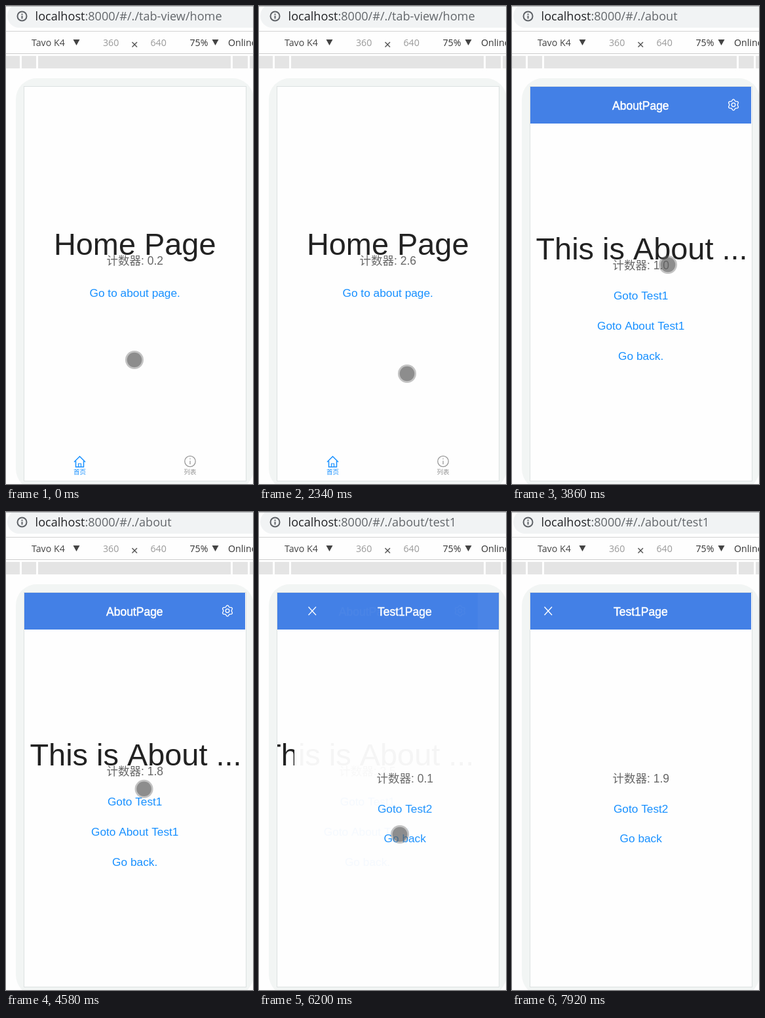
An HTML page with a canvas for the animation above (8 s loop, 377 by 728 pixels).

```html
<!DOCTYPE html>
<html lang="zh">
<head>
<meta charset="utf-8">
<title>Tab view</title>
<style>
html, body { margin: 0; width: 100%; height: 100%; overflow: hidden; background: #fff; }
canvas { display: block; width: 377px; height: 728px; }
</style>
</head>
<body>
<canvas id="stage" width="377" height="728"></canvas>
<script>
const W = 377, H = 728, LOOP = 8000, STEP = 90, RESYNC = 2960;
const SCREEN = { x: 28, y: 123, w: 338, h: 600 };
const MID = 196.7;
const BIG = 46.9, BODY = 17.3;
const SANS = '"Liberation Sans", "Noto Sans CJK SC", "Noto Sans CJK", sans-serif';
const UI = '"Open Sans", "Noto Sans", sans-serif';
const BLUE = '#1890ff', BAR = '#4380e6', WHITE = '#fefefe';
const SLIDE = 178, TICK = 95.5;

const stage = document.getElementById('stage').getContext('2d');
const layer = Object.assign(document.createElement('canvas'), { width: W, height: H });
const layerCtx = layer.getContext('2d');

// Each page: when it enters, when its counter starts, its address and painter
const pages = [
  { enter: -1000, zero: -232, url: 'tab-view/home', paint: paintHome },
  { enter: 2856, zero: 2856, url: 'about', paint: paintAbout },
  { enter: 6082, zero: 6075, url: 'about/test1', paint: paintTest }
];

// Pointer path: time, x, y
const path = [
  [0, 196, 539], [630, 198, 553], [800, 198, 553], [1530, 205, 594],
  [1620, 216, 623], [1800, 230, 655], [1980, 233, 659], [2340, 226, 560],
  [2610, 220, 444], [3420, 220, 444], [3680, 243, 412], [3860, 238, 394],
  [4220, 159, 391], [4400, 175, 395], [4850, 264, 462], [5030, 254, 478],
  [5300, 224, 485], [5660, 215, 491], [6780, 215, 491], [7480, 264, 275]
];
const POINTER_END = 7550;

function ease(p) {
  if (p <= 0) return 0;
  if (p >= 1) return 1;
  const bez = (a, b, u) => 3 * a * u * (1 - u) ** 2 + 3 * b * u * u * (1 - u) + u ** 3;
  let lo = 0, hi = 1;
  for (let i = 0; i < 24; i++) {
    const m = (lo + hi) / 2;
    if (bez(0.25, 0.25, m) < p) lo = m; else hi = m;
  }
  return bez(0.1, 1, lo);
}

function text(c, str, x, y, size, color, align = 'center', family = SANS) {
  c.font = `${size}px ${family}`;
  c.textAlign = align;
  c.fillStyle = color;
  c.fillText(str, x, y);
}

function rect(c, x, y, w, h, color) {
  c.fillStyle = color;
  c.fillRect(x, y, w, h);
}

function line(c, points, color, width, close) {
  c.beginPath();
  points.forEach(([x, y]) => c.lineTo(x, y));
  if (close) c.closePath();
  c.strokeStyle = color;
  c.lineWidth = width;
  c.stroke();
}

function ring(c, x, y, r, color, width) {
  c.beginPath();
  c.arc(x, y, r, 0, 7);
  c.strokeStyle = color;
  c.lineWidth = width;
  c.stroke();
}

function disc(c, x, y, r, color) {
  c.beginPath();
  c.arc(x, y, r, 0, 7);
  c.fillStyle = color;
  c.fill();
}

function infoIcon(c, x, y, r, color, width) {
  ring(c, x, y, r, color, width);
  rect(c, x - width / 2, y - r * 0.55, width, width, color);
  rect(c, x - width / 2, y - r * 0.1, width, r * 0.65, color);
}

function gear(c, x, y) {
  const pts = [];
  for (let i = 0; i < 48; i++) {
    const a = i * Math.PI / 24;
    const r = 7.2 + 1.1 * Math.cos(6 * a);
    pts.push([x + r * Math.sin(a), y - r * Math.cos(a)]);
  }
  line(c, pts, '#fff', 1.3, true);
  ring(c, x, y, 2.8, '#fff', 1.3);
}

function counter(c, value, y) {
  text(c, '计数器: ' + value, MID, y, 17.5, '#666');
}

function link(c, label, y) {
  text(c, label, MID, y, BODY, BLUE);
}

// Title is set a little heavier than regular
function header(c, title) {
  rect(c, 28, 123, 337, 56, BAR);
  text(c, title, 196.3, 158, 17.5, '#fff');
  c.strokeStyle = '#fff';
  c.lineWidth = 0.5;
  c.strokeText(title, 196.3, 158);
}

function paintHome(c, value) {
  text(c, 'Home Page', MID, 379, BIG, '#222');
  counter(c, value, 394);
  link(c, 'Go to about page.', 443);
  line(c, [[104, 694.5], [112.5, 686], [121, 694.5]], BLUE, 1.5);
  line(c, [[106.5, 693], [106.5, 702], [118.5, 702], [118.5, 693]], BLUE, 1.5);
  line(c, [[110.5, 702], [110.5, 697], [114.5, 697], [114.5, 702]], BLUE, 1.2);
  text(c, '首页', 112.5, 713, 9.5, BLUE);
  infoIcon(c, 281, 693.5, 8.2, '#999', 1.3);
  text(c, '列表', 281, 713, 9.5, '#949494');
}

function paintAbout(c, value) {
  header(c, 'AboutPage');
  gear(c, 338, 150.5);
  text(c, 'This is About ...', 198, 386, BIG, '#222');
  counter(c, value, 401);
  link(c, 'Goto Test1', 447);
  link(c, 'Goto About Test1', 493);
  link(c, 'Go back.', 539);
}

function paintTest(c, value) {
  header(c, 'Test1Page');
  line(c, [[49.5, 144.5], [61, 157]], '#fff', 1.4);
  line(c, [[61, 144.5], [49.5, 157]], '#fff', 1.4);
  counter(c, value, 412);
  link(c, 'Goto Test2', 458);
  link(c, 'Go back', 503);
}

function arrow(c, x, y) {
  c.beginPath();
  c.moveTo(x - 5, y - 4);
  c.lineTo(x + 5, y - 4);
  c.lineTo(x, y + 5);
  c.fillStyle = '#444';
  c.fill();
}

function paintBrowser(c, url) {
  rect(c, 0, 0, W, H, '#fefefe');
  c.beginPath();
  c.roundRect(2, -3, 420, 36, 18);
  c.fillStyle = '#f1f3f4';
  c.fill();
  rect(c, 0, 0, W, 1, '#b4b6b8');
  infoIcon(c, 24.5, 15.5, 7, '#5f6368', 2);
  const host = 'localhost';
  text(c, host, 44.6, 22, 18.1, '#202124', 'left', UI);
  const x = 44.6 + c.measureText(host).width;
  text(c, ':8000/#/./' + url, x, 22, 18.1, '#63676b', 'left', UI);

  rect(c, 0, 38, W, 1, '#d2d2d2');
  rect(c, 0, 72, W, 1, '#cccccc');
  const label = (s, lx, color) => text(c, s, lx, 61, 14.2, color, 'left', UI);
  label('Tavo K4', 39, '#444');
  arrow(c, 107.5, 55);
  label('360', 148, '#999');
  line(c, [[192.5, 55], [200, 62.5]], '#555', 1.4);
  line(c, [[200, 55], [192.5, 62.5]], '#555', 1.4);
  label('640', 220.5, '#999');
  label('75%', 280.5, '#333');
  arrow(c, 319.5, 55);
  label('Online', 339, '#333');

  rect(c, 0, 76, W, 19, '#e4e4e4');
  [21, 46, 343, 369].forEach(gap => rect(c, gap, 76, 3, 19, '#fefefe'));

  c.beginPath();
  c.roundRect(15, 110, 363, 627, 32);
  c.fillStyle = '#f2f5f4';
  c.fill();
  rect(c, 27, 122, 340, 602, '#dce1e1');
  rect(c, SCREEN.x, SCREEN.y, SCREEN.w, SCREEN.h, WHITE);
}

function paintPage(c, page, t) {
  const value = Math.max(0, Math.floor((t - page.zero) / TICK)) / 10;
  page.paint(c, value.toFixed(1));
}

function paintScreen(c, current, t) {
  const page = pages[current];
  const k = ease((t - page.enter) / SLIDE);
  c.save();
  c.beginPath();
  c.rect(SCREEN.x, SCREEN.y, SCREEN.w, SCREEN.h);
  c.clip();
  if (k < 1) {
    c.save();
    c.translate(-0.1 * SCREEN.w * k, 0);
    paintPage(c, pages[current - 1], t);
    c.restore();
    layerCtx.clearRect(0, 0, W, H);
    rect(layerCtx, SCREEN.x, SCREEN.y, SCREEN.w, SCREEN.h, WHITE);
    paintPage(layerCtx, page, t);
    c.globalAlpha = 0.5 + 0.5 * k;
    c.drawImage(layer, Math.round(SCREEN.w * (1 - k)), 0);
  } else {
    paintPage(c, page, t);
  }
  c.restore();
}

function paintPointer(c, t) {
  if (t >= POINTER_END) return;
  let i = path.findIndex(p => p[0] > t);
  if (i < 0) i = path.length - 1;
  const [t0, x0, y0] = path[i - 1], [t1, x1, y1] = path[i];
  const k = Math.min(1, (t - t0) / (t1 - t0));
  const x = x0 + (x1 - x0) * k, y = y0 + (y1 - y0) * k;
  disc(c, x, y, 14, 'rgba(107,107,107,0.4)');
  disc(c, x, y, 11.3, 'rgba(90,90,90,0.51)');
}

function sample(t) {
  const base = t < RESYNC ? 0 : RESYNC;
  return base + Math.floor((t - base) / STEP) * STEP;
}

function draw(now) {
  const t = sample(now % LOOP);
  const current = pages.findLastIndex(p => t >= p.enter);
  paintBrowser(stage, pages[current].url);
  paintScreen(stage, current, t);
  paintPointer(stage, t);
}

const start = performance.now();
function tick() {
  draw(performance.now() - start);
  requestAnimationFrame(tick);
}
tick();
</script>
</body>
</html>
```
